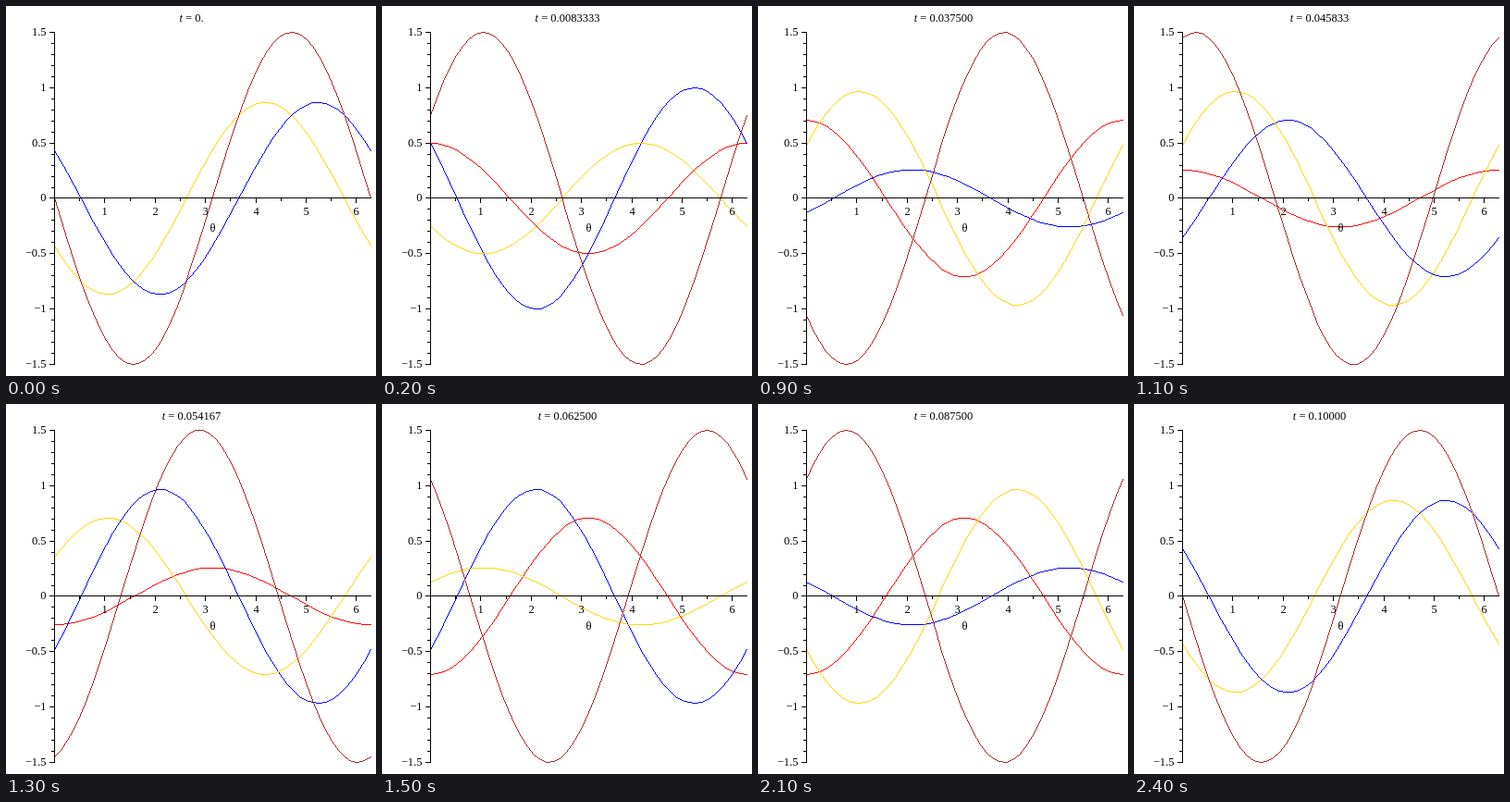
Recreate the animation shown at these times as an HTML page with a canvas. Size 400x400 px, loop 2.5 s.

```html
<!DOCTYPE html>
<html lang="en">
<head>
<meta charset="utf-8">
<title>Rotating waves</title>
<style>
  html, body { margin: 0; width: 100%; height: 100%; overflow: hidden; background: #fff; }
  canvas, svg { position: absolute; left: 0; top: 0; width: 400px; height: 400px; }
  text { font: 12.5px "Liberation Serif", Times, serif; fill: #000; }
  .var { font-style: italic; }
  path { fill: none; stroke: #000; stroke-width: 1; shape-rendering: crispEdges; }
</style>
</head>
<body>
<canvas id="waves" width="400" height="400"></canvas>
<svg id="axes" viewBox="0 0 400 400"></svg>
<script>
const STEP_MS = 100, STEPS = 25, SAMPLES = 49;
const TAU = 2 * Math.PI;
const ctx = document.getElementById('waves').getContext('2d');
const axes = document.getElementById('axes');

// Data to whole pixels
const col = x => Math.round(52 + x * 54.4);
const row = y => Math.round(207.49 - y * 119.67);

function add(tag, attrs, content = '') {
  const el = document.createElementNS('http://www.w3.org/2000/svg', tag);
  for (const name in attrs) el.setAttribute(name, attrs[name]);
  el.textContent = content;
  axes.appendChild(el);
  return el;
}

function label(x, y, content, anchor = 'middle') {
  return add('text', { x, y, 'text-anchor': anchor }, content);
}

// One phase winding, shifted in space and time by the same angle
const winding = shift => (x, a) => Math.sin(a - shift) * Math.cos(x - shift);

const curves = [
  { color: '#ff0000', f: winding(0) },
  { color: '#0000ff', f: winding(TAU / 3) },
  { color: '#ffd700', f: winding(2 * TAU / 3) },
  { color: '#a52a2a', f: (x, a) => 1.5 * Math.sin(5 * a - x) }
];

function drawAxes() {
  let d = 'M52.5 28V388M52 207.5H395';
  for (let i = -15; i <= 15; i++) {
    const major = i % 5 === 0;
    const y = row(i / 10);
    d += `M${major ? 47 : 49} ${y + 0.5}H53`;
    if (major) label(43.5, y + 4, String(i / 10).replace('-', '\u2212'), 'end');
  }
  for (let i = 1; i <= 12; i++) {
    const major = i % 2 === 0;
    const x = col(i / 2) + 0.5;
    d += `M${x} 207V${major ? 213 : 211}`;
    if (major) label(x, 226, i / 2);
  }
  add('path', { d });
  label(223.5, 244, '\u03b8');
}

// One-pixel line without smoothing
function line(x0, y0, x1, y1) {
  const n = Math.max(Math.abs(x1 - x0), Math.abs(y1 - y0), 1);
  for (let i = 0; i <= n; i++) {
    const x = Math.round(x0 + (x1 - x0) * i / n);
    const y = Math.round(y0 + (y1 - y0) * i / n);
    ctx.fillRect(x, y, 1, 1);
  }
}

drawAxes();
const title = label(200.5, 17, '');
title.innerHTML = '<tspan class="var">t</tspan> = <tspan></tspan>';
const clock = title.lastChild;

function draw(step) {
  const angle = TAU * step / 24;
  ctx.clearRect(0, 0, 400, 400);
  for (const { f, color } of curves) {
    ctx.fillStyle = color;
    let x0 = col(0), y0 = row(f(0, angle));
    for (let i = 1; i <= SAMPLES; i++) {
      const x = TAU * i / SAMPLES;
      const x1 = col(x), y1 = row(f(x, angle));
      line(x0, y0, x1, y1);
      x0 = x1;
      y0 = y1;
    }
  }
  clock.textContent = step ? (step / 240).toPrecision(5) : '0.';
}

const start = performance.now();
let shown = -1;

function tick() {
  const step = Math.floor((performance.now() - start) / STEP_MS) % STEPS;
  if (step !== shown) draw(shown = step);
  requestAnimationFrame(tick);
}
tick();
</script>
</body>
</html>
```
